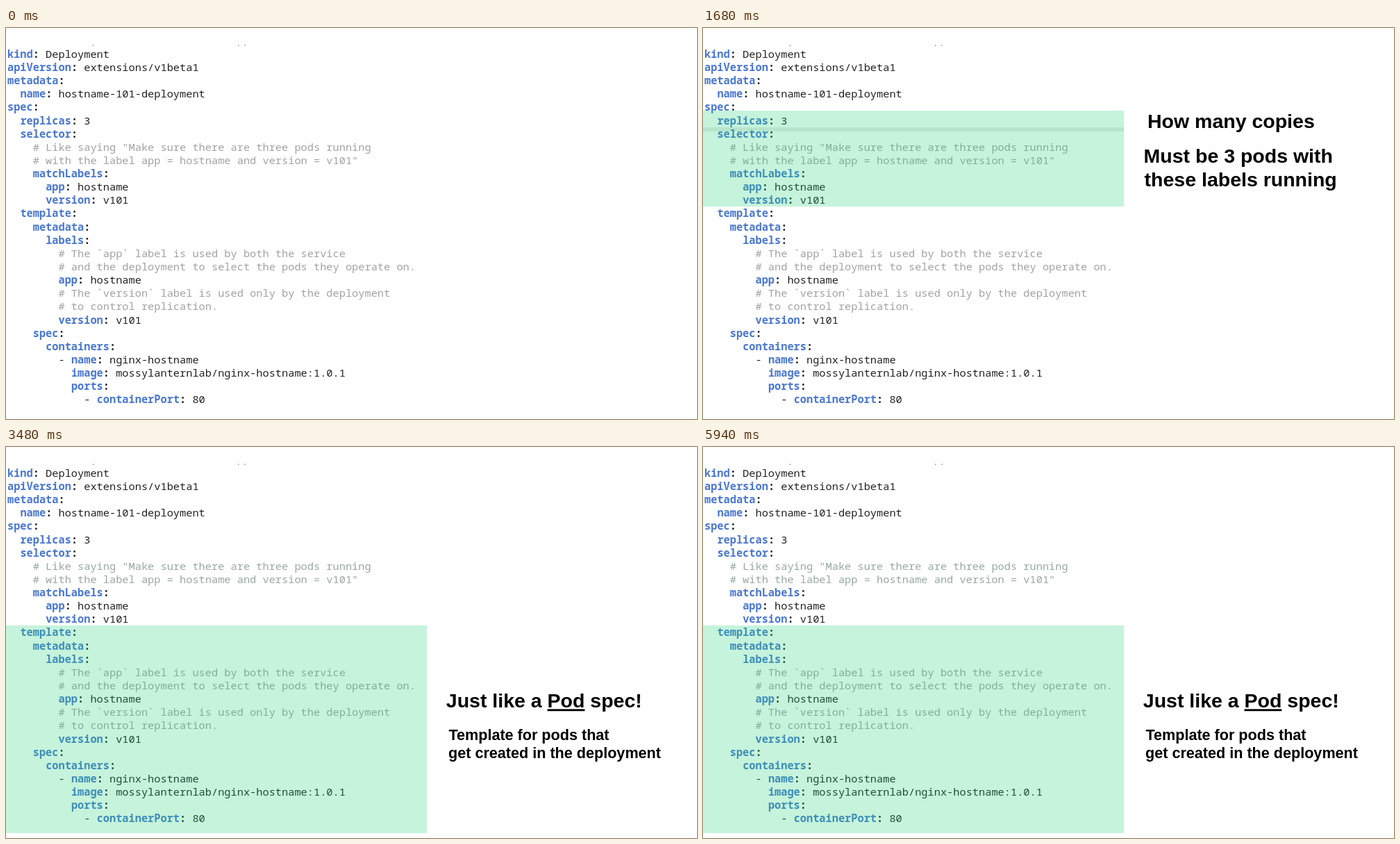
Recreate the animation shown at these times as an HTML page. Size 995 px wide and 563 px high, loop 6000 ms.

```html
<!DOCTYPE html>
<html lang="en">
<head>
<meta charset="utf-8">
<title>Deployment walkthrough</title>
<style>
  html, body { margin: 0; width: 100%; height: 100%; overflow: hidden; background: #fff; }
  svg { display: block; width: 995px; height: 563px; }
  text { white-space: pre; }

  .code { font: 15.32px "Noto Sans Mono", "DejaVu Sans Mono", monospace; fill: #222; }
  .key, .colon { font-weight: 700; }
  .key { fill: #4a77d0; }
  .comment { fill: #a2a2a2; }
  .tint { animation: tint 6s step-end infinite; }

  .note { font: 700 28.5px "Liberation Sans", Arial, sans-serif; }
  .small { font-size: 21.6px; }
  .underline { text-decoration: underline; text-decoration-thickness: 2px; }

  .mark { fill: rgba(27, 207, 111, .25); }
  .step { opacity: 0; animation: 6s step-end infinite; }
  .copies { animation-name: copies; }
  .labels { animation-name: labels; }
  .template { animation-name: template; }
  .seam { animation: seam 6s step-end infinite; }

  @keyframes copies { 0% { opacity: 0 } 5.9% { opacity: 1 } 38.9%, 100% { opacity: 0 } }
  @keyframes labels { 0% { opacity: 0 } 27.9% { opacity: 1 } 57.9%, 100% { opacity: 0 } }
  @keyframes template { 0% { opacity: 0 } 57.9%, 100% { opacity: 1 } }
  /* the strip shared by the first two highlights */
  @keyframes seam {
    0% { fill: rgba(27, 207, 111, .25) }
    27.9%, 100% { fill: rgba(0, 0, 0, .08) }
  }
  @keyframes tint { 0% { fill: #a2a2a2 } 57.9%, 100% { fill: #97a8a1 } }
</style>
</head>
<body>
<svg viewBox="0 0 995 563">
  <clipPath id="cut"><rect y="24" width="606" height="2"/></clipPath>
  <g clip-path="url(#cut)">
    <text class="code comment" x="2" y="22.5">             y                      pp</text>
  </g>
  <g id="code" class="code"></g>

  <g class="step copies">
    <rect class="mark" y="119" width="606" height="24"/>
    <rect class="seam" y="143" width="606" height="6"/>
    <text class="note" x="640" y="144.2">How many copies</text>
  </g>

  <g class="step labels">
    <rect class="mark" y="143" width="606" height="114"/>
    <text class="note" x="634.6" y="193.8">Must be 3 pods with</text>
    <text class="note" x="635.6" y="228.2">these labels running</text>
  </g>

  <g class="step template">
    <rect class="mark" y="257" width="606" height="299"/>
    <text class="note" x="633.8" y="375.4">Just like a <tspan class="underline">Pod</tspan> spec!</text>
    <text class="note small" x="637.4" y="421.8">Template for pods that</text>
    <text class="note small" x="637" y="448">get created in the deployment</text>
  </g>
</svg>

<script type="text/plain" id="yaml">
kind: Deployment
apiVersion: extensions/v1beta1
metadata:
  name: hostname-101-deployment
spec:
  replicas: 3
  selector:
    # Like saying "Make sure there are three pods running
    # with the label app = hostname and version = v101"
    matchLabels:
      app: hostname
      version: v101
  template:
    metadata:
      labels:
        # The `app` label is used by both the service
        # and the deployment to select the pods they operate on.
        app: hostname
        # The `version` label is used only by the deployment
        # to control replication.
        version: v101
    spec:
      containers:
        - name: nginx-hostname
          image: mossylanternlab/nginx-hostname:1.0.1
          ports:
            - containerPort: 80
</script>
<script>
  const code = document.getElementById('code');
  const lines = document.getElementById('yaml').textContent.replace(/^\n|\n$/g, '').split('\n');

  function add(parent, name, text, className) {
    const el = document.createElementNS('http://www.w3.org/2000/svg', name);
    if (className) el.setAttribute('class', className);
    el.textContent = text;
    return parent.appendChild(el);
  }

  lines.forEach((line, row) => {
    const text = add(code, 'text', '');
    text.setAttribute('x', 2);
    text.setAttribute('y', 42.8 + row * 19.14);
    if (/^\s*#/.test(line)) {
      add(text, 'tspan', line, row < 12 ? 'comment tint' : 'comment');
      return;
    }
    const [, lead, key, value] = line.match(/^(\s*(?:- )?)(\w+):(.*)$/);
    add(text, 'tspan', lead);
    add(text, 'tspan', key, 'key');
    add(text, 'tspan', ':', 'colon');
    add(text, 'tspan', value);
  });
</script>
</body>
</html>
```
